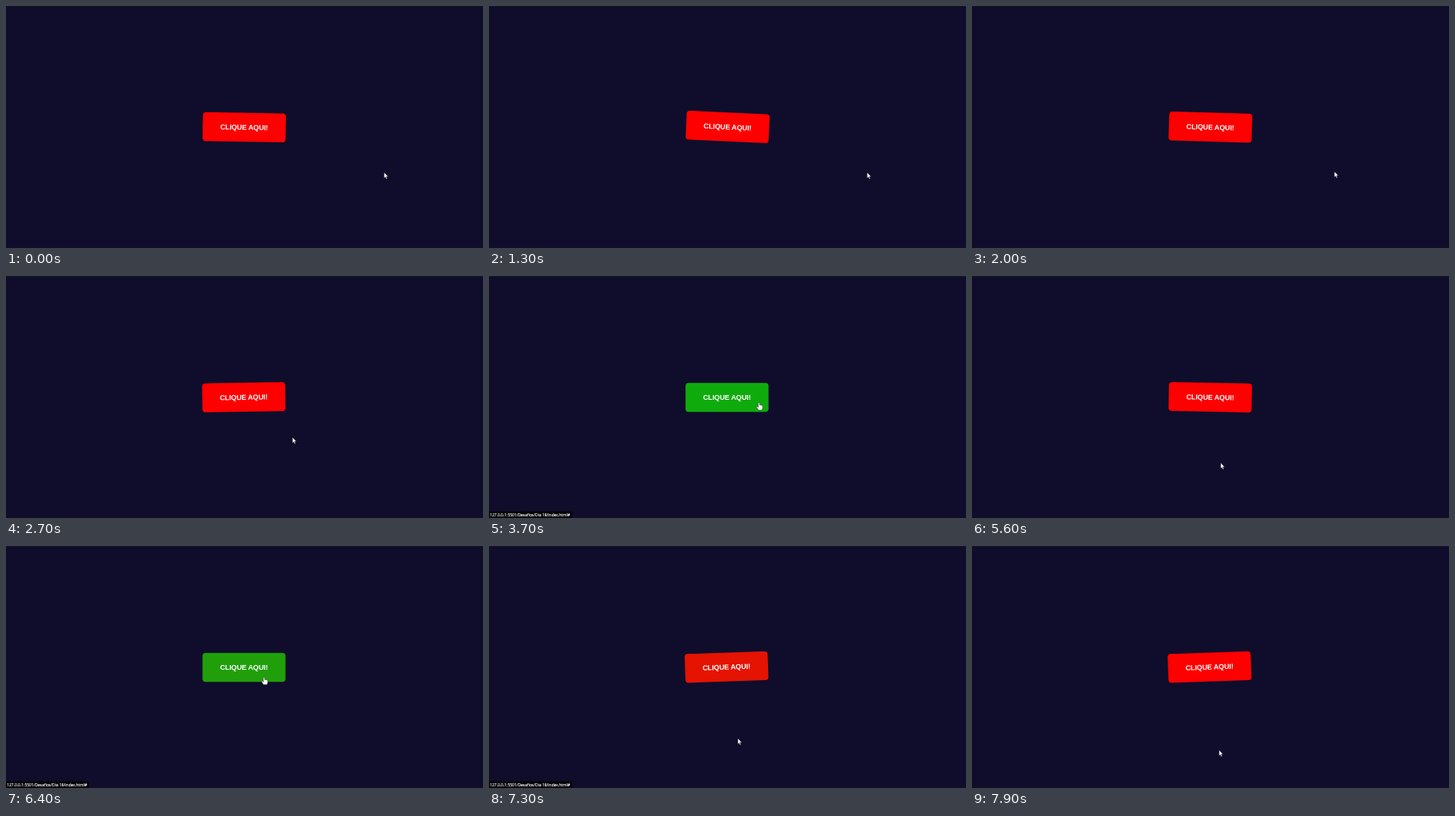
An HTML page for the animation above (8 s loop, 600 by 305 pixels).

```html
<!DOCTYPE html>
<html lang="pt-BR">
<head>
<meta charset="utf-8">
<title>Botão</title>
<style>
  html, body { margin: 0; width: 100%; height: 100%; overflow: hidden; background: #0f0d2b; }
  svg { display: block; width: 100vw; height: 100vh; }
  .label { font: bold 9px "Liberation Sans", Arial, sans-serif; letter-spacing: -.13px; fill: #fff; text-anchor: middle; }
  .url { font: 4.94px "Open Sans", "Noto Sans", sans-serif; fill: #fff; stroke: #fff; stroke-width: .12px; }
</style>
</head>
<body>
<svg viewBox="0 0 600 305" preserveAspectRatio="none">
  <rect width="600" height="305" fill="#0f0d2b"/>
  <rect width="600" height="1" fill="#131624"/>
  <rect y="301" width="600" height="4" fill="#110d2b"/>
  <g id="button">
    <rect id="face" x="-52.2" y="-18.2" width="104.4" height="36.4" rx="4"/>
    <text class="label" x="-0.2" y="3.2">CLIQUE AQUI!</text>
  </g>
  <g id="status">
    <path d="M0 296.5H102.5Q104.5 296.5 104.5 298.5V305H0Z" fill="#050508"/>
    <text class="url" x="1.2" y="302.8">127.0.0.1:5501/Desafios/Dia 18/index.html#</text>
  </g>
  <g id="cursor">
    <path id="arrow" d="M0 0V7.2L1.6 5.7L2.7 8.2L3.9 7.7L2.8 5.2H5Z" fill="#fff" stroke="#0a0a18" stroke-width=".4"/>
    <path id="hand" d="M-.9 .8Q-.9 0 -.1 0T.8 .8V3.2Q1.7 2.7 2.2 3.4Q3 3 3.5 3.7Q4.6 3.5 4.6 4.7V7L3.8 9.6H-.7L-3 6.1Q-3.2 5 -2.2 5.1L-.9 6.2Z" fill="#fff" stroke="#0a0a18" stroke-width=".4"/>
  </g>
</svg>
<script>
const LOOP = 8000, STEP = 100, SHAKE = 600, FADE = 620;
const STATUS_ON = 380, STATUS_OFF = 640;
const RED = [255, 0, 0], GREEN = [6, 178, 12];
const hovers = [[3230, 4360], [6020, 6920]];

// pointer glides: each eases from wherever the last one ended
const home = { x: 475.6, y: 209.8 };
const glides = [
  { from: 1750, to: 2700, x: 360.3, y: 203.2 },
  { from: 2700, to: 3500, x: 339.6, y: 159.4 },
  { from: 4200, to: 4960, x: 305.6, y: 279 },
  { from: 5200, to: 6150, x: 324.6, y: 165.2 },
  { from: 6800, to: 7470, x: 310.8, y: 257.2 }
];

const get = id => document.getElementById(id);
const [button, face, status, cursor, arrow, hand] =
  ["button", "face", "status", "cursor", "arrow", "hand"].map(get);
const mix = (a, b, k) => a + (b - a) * k;
const clamp = x => Math.min(1, Math.max(0, x));
const smooth = x => x * x * (3 - 2 * x);
const show = (el, on) => el.setAttribute("visibility", on ? "visible" : "hidden");

// whether a hover is in effect, given its delays for starting and ending
const hoverActive = (t, on = 0, off = 0) =>
  hovers.some(([a, b]) => t >= a + on && t < b + off);

// CSS "ease": cubic-bezier(.25, .1, .25, 1)
function ease(x) {
  if (x <= 0) return 0;
  if (x >= 1) return 1;
  let lo = 0, hi = 1, u;
  for (let i = 0; i < 20; i++) {
    u = (lo + hi) / 2;
    if (.75 * u * (1 - u) + u ** 3 < x) lo = u; else hi = u;
  }
  return .3 * u * (1 - u) ** 2 + 3 * u * u * (1 - u) + u ** 3;
}

function pointerAt(t) {
  return glides.reduce((p, g) => {
    const k = smooth(clamp((t - g.from) / (g.to - g.from)));
    return { x: mix(p.x, g.x, k), y: mix(p.y, g.y, k) };
  }, home);
}

const greenness = t => hovers.reduce((sum, [a, b]) =>
  sum + ease((t - a) / FADE) - ease((t - b) / FADE), 0);

function draw(t) {
  const hovered = hoverActive(t);
  const start = hovers.reduce((s, [, end]) => t >= end ? end : s, -36);
  const swing = hovered ? 0 : Math.sin((t - start) / SHAKE * 2 * Math.PI);
  const x = 299.4 + .8 * swing, y = 153 - .6 * Math.abs(swing);
  button.setAttribute("transform", `translate(${x} ${y}) rotate(${2.7 * swing})`);

  const g = greenness(t);
  face.setAttribute("fill", `rgb(${RED.map((c, i) => Math.round(mix(c, GREEN[i], g)))})`);

  show(status, hoverActive(t, STATUS_ON, STATUS_OFF));
  show(arrow, !hovered);
  show(hand, hovered);
  const p = pointerAt(t);
  cursor.setAttribute("transform", `translate(${p.x} ${p.y})`);
}

const origin = performance.now();
function tick() {
  const t = (performance.now() - origin) % LOOP;
  draw(Math.floor(t / STEP) * STEP);
  requestAnimationFrame(tick);
}
tick();
</script>
</body>
</html>
```
